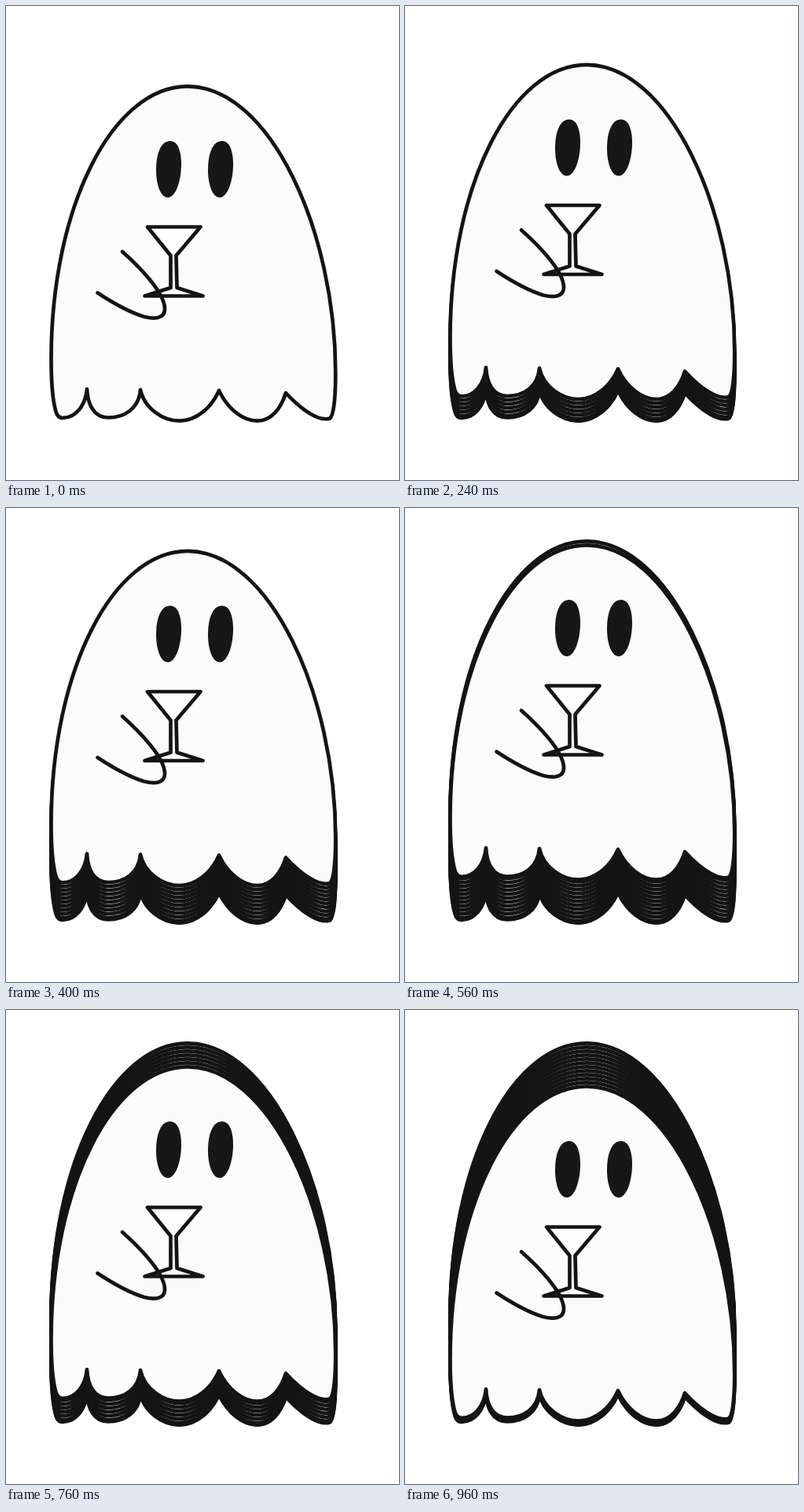
Write an HTML page that moves like this. It is 500 px wide and 604 px high and loops after 1 s.

```html
<!DOCTYPE html>
<html lang="en">
<head>
<meta charset="utf-8">
<title>Floating ghost</title>
<style>
  html, body { margin: 0; width: 100%; height: 100%; overflow: hidden; background: #fff; }
  svg { display: block; width: 100%; height: 100%; }
</style>
</head>
<body>
<svg id="stage" viewBox="0 0 500 604">
  <defs>
    <g id="ghost" stroke="#141414" stroke-width="4.7" stroke-linecap="round" stroke-linejoin="round" fill="none">
      <path fill="#fbfbfb" d="M231 102.4
        C335 102.4 419.3 285 419.3 468 C419.3 490 418 521 412 525.5
        C399 529.5 378 517 356 493
        C350 513 337 528.7 320 528.7 C302 528.7 282 514 271 490
        C261 513 241 528.7 221 528.7 C200 528.7 176 513 171 489
        C169 513 151 524.5 130 524.5 C112 524.5 104 508 103 488
        C101 510 88 525 72 524.8 C67 525 65 522 63.5 517
        C59.5 503 57.5 480 57.5 450
        C57.5 255 136 102.4 231 102.4 Z"/>
      <g fill="#171717" stroke="none">
        <path id="eye" d="M209 172 C219 172 223 186 223 202 C223 222 216 244 206 244
          C196 244 191 226 191 209 C191 188 197 172 209 172 Z"/>
        <use href="#eye" x="66"/>
      </g>
      <path fill="#fefcfe" d="M180 281.5 H247.5 L216.5 318 L217.5 359 L250.5 369.5 H176.5 L209.5 359 V318 Z"/>
      <path d="M148 313 C166 329 202 364 202 386 C202 399 188 399 176 396 C156 390 137 379 116.5 365.5"/>
    </g>
  </defs>
</svg>
<script>
  const LOOP = 1000, STEP = 40, COUNT = LOOP / STEP, PEAK = 13;
  const stage = document.getElementById('stage');

  // Rises to the peak, then sinks back, 5px per step.
  function lift(k) {
    if (k === 0) return 0;
    return k < PEAK ? 5 * k - 2.5 : 5 * (COUNT - k);
  }

  const layers = Array.from({ length: COUNT }, (_, k) => {
    const use = document.createElementNS('http://www.w3.org/2000/svg', 'use');
    use.setAttribute('href', '#ghost');
    use.setAttribute('y', -lift(k));
    stage.appendChild(use);
    return use;
  });

  // Each pose stays behind the next one until the loop restarts.
  function draw(time) {
    const now = Math.floor((time % LOOP) / STEP);
    layers.forEach((layer, k) => {
      layer.style.display = k <= now ? '' : 'none';
    });
  }

  let start;
  function tick(t) {
    start ??= t;
    draw(t - start);
    requestAnimationFrame(tick);
  }
  draw(0);
  requestAnimationFrame(tick);
</script>
</body>
</html>
```
